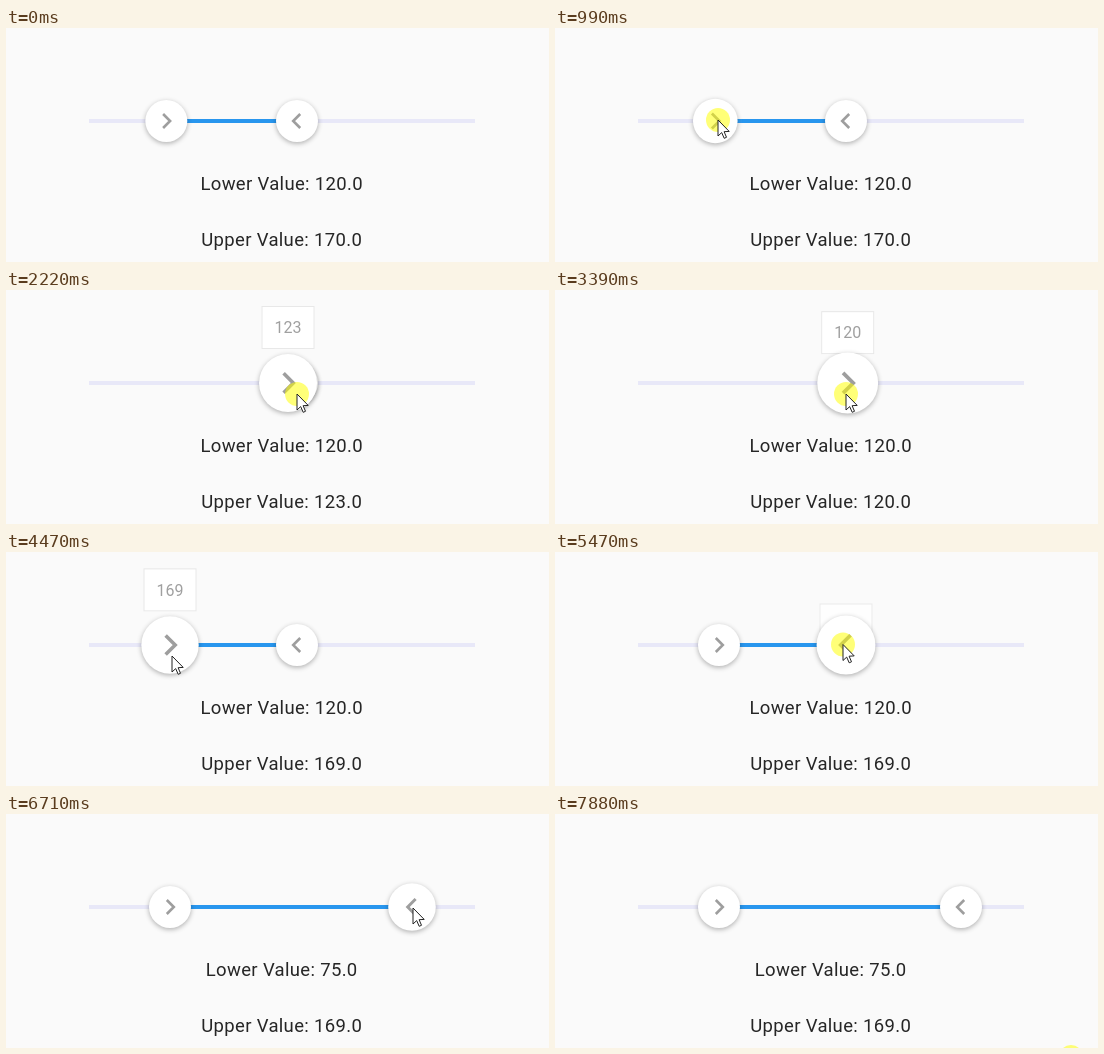
Animation of 543x234 px, one loop 7950 ms. Source, as an HTML page with a canvas:

```html
<!DOCTYPE html>
<html lang="en">
<head>
<meta charset="utf-8">
<title>Range slider</title>
<style>
  html, body { margin: 0; width: 100%; height: 100%; overflow: hidden; background: #fafafa; }
  canvas { display: block; width: 543px; height: 234px; }
</style>
</head>
<body>
<canvas id="stage"></canvas>
<script>
const W = 543, H = 234, LOOP = 7950;
const STEP = LOOP / 103;
const TRACK = { x0: 83, x1: 469, y: 93 };
const VALUES = { max: 200, span: 150 };
const RADIUS = 21, GROWTH = 8, LAG = 55;
const FONT = 'Roboto, Arial, sans-serif';

const canvas = document.getElementById('stage');
const ctx = canvas.getContext('2d');
const dpr = window.devicePixelRatio || 1;
canvas.width = W * dpr;
canvas.height = H * dpr;

// Thumbs: side -1 is the left one, 1 the right one
const THUMBS = [{ side: -1, x: 160.3 }, { side: 1, x: 291 }];

// The pointer's journey; a drag takes a thumb along
const ENTRY = { x: 441, y: 240 };
const MOVES = [
  { start: 73, end: 760, x: 163, y: 92 },
  { start: 1492, end: 2160, x: 291, y: 104, drag: { side: -1, to: 292.7, down: 990, up: 2390 } },
  { start: 3400, end: 3930, x: 166, y: 104, drag: { side: -1, to: 164, down: 3235, up: 4470 } },
  { start: 4800, end: 5320, x: 288, y: 92.5 },
  { start: 5870, end: 6320, x: 407, y: 94, drag: { side: 1, to: 406, down: 5405, up: 6560 } },
  { start: 7110, end: 7630, x: 516, y: 243 }
];
const DRAGS = MOVES.filter(m => m.drag).map(m => ({ ...m, ...m.drag }));
const LAST_CLICK = 7870;

const clamp = u => Math.max(0, Math.min(1, u));
const mix = (a, b, u) => a + (b - a) * u;
const progress = (t, start, end) => clamp((t - start) / (end - start));
const smooth = u => u * u * (3 - 2 * u);
const elastic = u => 1 + Math.pow(2, -10 * u) * Math.sin((u - .1) * 5 * Math.PI);

const valueAt = x =>
  Math.ceil(VALUES.max - (x - TRACK.x0) * VALUES.span / (TRACK.x1 - TRACK.x0));

function pointerAt(t) {
  return MOVES.reduce((p, m) => {
    const u = progress(t, m.start, m.end);
    return { x: mix(p.x, m.x, u), y: mix(p.y, m.y, u) };
  }, ENTRY);
}

function thumbAt(t, { side, x }) {
  const drags = DRAGS.filter(d => d.side === side);
  for (const d of drags) x = mix(x, d.to, progress(t, d.start + LAG, d.end + LAG));

  const drag = drags.filter(d => t >= d.down).pop();
  if (!drag) return { side, x, r: RADIUS, lift: 0, touched: 0 };
  const held = t < drag.up;
  const grow = held
    ? elastic(clamp((t - drag.down) / 700))
    : Math.pow(1 - clamp((t - drag.up) / 380), 2);
  const lift = held
    ? smooth(clamp((t - drag.down) / 200))
    : 1 - smooth(clamp((t - drag.up) / 140));
  return { side, x, r: RADIUS + GROWTH * grow, lift, touched: drag.down };
}

function bar(x0, x1, color) {
  if (x1 <= x0) return;
  ctx.fillStyle = color;
  ctx.fillRect(x0, TRACK.y - 2, x1 - x0, 4);
}

function label(text, x, y, size, color, spacing = 0) {
  ctx.font = `${size}px ${FONT}`;
  ctx.letterSpacing = `${spacing}px`;
  ctx.textAlign = 'center';
  ctx.fillStyle = color;
  ctx.fillText(text, x, y);
}

function drawThumb({ x, r, side }) {
  ctx.save();
  ctx.translate(x, TRACK.y);
  ctx.shadowColor = 'rgba(0,0,0,.3)';
  ctx.shadowBlur = 5 * dpr;
  ctx.shadowOffsetY = 1.5 * dpr;
  ctx.fillStyle = '#fff';
  ctx.beginPath();
  ctx.arc(0, 0, r, 0, Math.PI * 2);
  ctx.fill();
  ctx.shadowColor = 'transparent';
  ctx.scale(-side * r / RADIUS, r / RADIUS);
  ctx.strokeStyle = '#9e9e9e';
  ctx.lineWidth = 2.6;
  ctx.beginPath();
  ctx.moveTo(-3.2, -7);
  ctx.lineTo(3.8, 0);
  ctx.lineTo(-3.2, 7);
  ctx.stroke();
  ctx.restore();
}

function drawTooltip({ x, lift }, value) {
  if (lift <= 0) return;
  const top = mix(69, 17, lift);
  ctx.save();
  ctx.globalAlpha = clamp(lift * 2.5);
  ctx.fillStyle = '#fff';
  ctx.fillRect(x - 26.3, top, 52.6, 42);
  ctx.strokeStyle = '#e8e8e8';
  ctx.lineWidth = 1;
  ctx.strokeRect(x - 26, top - .5, 52, 42);
  label(value, x, top + 26.2, 16, '#a0a0a0');
  ctx.restore();
}

function drawPointer({ x, y }, pressed) {
  if (pressed) {
    ctx.fillStyle = 'rgba(255,255,0,.53)';
    ctx.beginPath();
    ctx.arc(x, y, 12, 0, Math.PI * 2);
    ctx.fill();
  }
  ctx.save();
  ctx.translate(x, y);
  ctx.fillStyle = '#fff';
  ctx.strokeStyle = '#222';
  ctx.lineWidth = 1;
  const arrow = new Path2D('M0 0V16L3.7 12.6 6.2 18.3 8.5 17.3 6.1 11.7 11.2 11.4Z');
  ctx.fill(arrow);
  ctx.stroke(arrow);
  ctx.restore();
}

function draw(t) {
  const [left, right] = THUMBS.map(th => thumbAt(t, th));
  const lower = valueAt(right.x), upper = Math.max(lower, valueAt(left.x));
  const pressed = t >= LAST_CLICK || DRAGS.some(d => t >= d.down && t < d.up);

  ctx.setTransform(dpr, 0, 0, dpr, 0, 0);
  ctx.fillStyle = '#fafafa';
  ctx.fillRect(0, 0, W, H);

  bar(TRACK.x0, TRACK.x1, '#e8e8f8');
  bar(left.x, right.x, '#2896ee');
  label(`Lower Value: ${lower.toFixed(1)}`, 275.7, 161.8, 18.5, '#262626', .33);
  label(`Upper Value: ${upper.toFixed(1)}`, 275.7, 218.2, 18.5, '#262626', .33);

  // The thumb touched last lies on top
  for (const th of [left, right].sort((a, b) => a.touched - b.touched)) {
    drawTooltip(th, th === left ? upper : lower);
    drawThumb(th);
  }
  drawPointer(pointerAt(t), pressed);
}

const begin = performance.now();
function frame() {
  const t = (performance.now() - begin) % LOOP;
  draw(Math.floor(t / STEP + .2) * STEP);
  requestAnimationFrame(frame);
}
frame();
</script>
</body>
</html>
```
